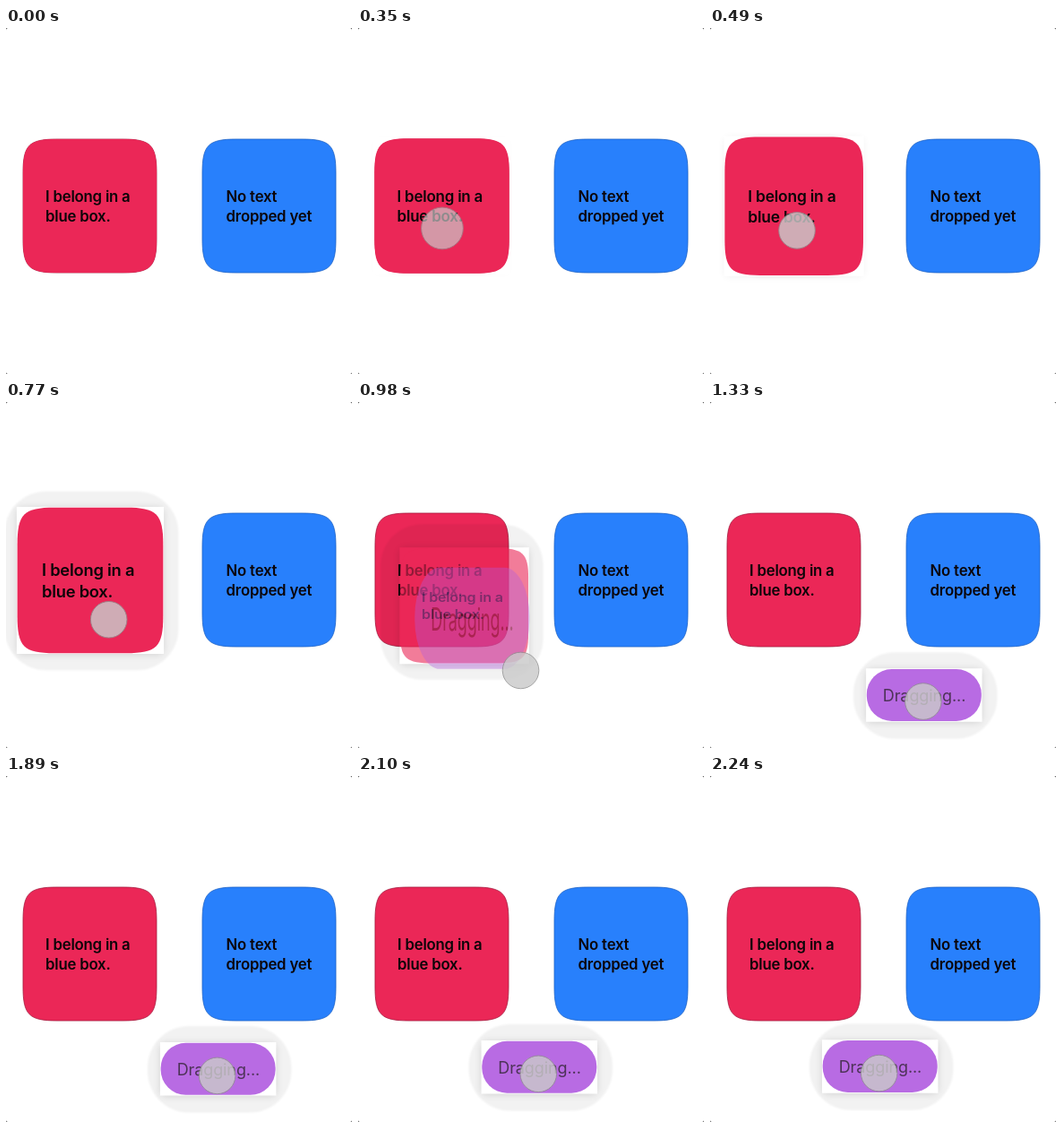
An HTML page for the animation above (2800 ms loop, 386 by 386 pixels).

```html
<!DOCTYPE html>
<html lang="en">
<head>
<meta charset="utf-8">
<title>Drag preview</title>
<style>
  html, body { margin: 0; width: 100%; height: 100%; overflow: hidden; background: #555; }
  svg { display: block; width: 100vw; height: 100vh; }
  text { font-family: Inter, "Liberation Sans", sans-serif; fill: #0b0508; white-space: pre; }
  .label { font-size: 16.8px; font-weight: 600; letter-spacing: -0.22px; }
  .drag { font-size: 18px; font-weight: 400; letter-spacing: -0.1px; fill-opacity: .72; }
</style>
</head>
<body>
<svg viewBox="0 0 386 386">
  <defs>
    <filter id="soft" x="-20%" y="-20%" width="140%" height="140%"><feGaussianBlur stdDeviation="1"/></filter>
    <filter id="near" x="-20%" y="-20%" width="140%" height="140%"><feGaussianBlur stdDeviation="4"/></filter>
    <clipPath id="outside"><path id="hole" clip-rule="evenodd"/></clipPath>
  </defs>
  <rect width="386" height="386" rx="2.5" fill="#fff"/>
  <g id="boxes"></g>
  <g clip-path="url(#outside)">
    <rect id="halo" rx="46" filter="url(#soft)"/>
    <rect id="rim" rx="6" filter="url(#near)"/>
  </g>
  <g id="card"></g>
  <g id="pill">
    <rect width="128" height="58" rx="28" fill="#b15be0"/>
    <text class="drag" x="18" y="36">Dragging...</text>
  </g>
  <circle id="touch" fill="#cacaca" stroke="#8f8f8f"/>
</svg>
<script>
const LOOP = 2800, STEP = 70, SIZE = 149, PILL_W = 128, PILL_H = 58;
const $ = id => document.getElementById(id);
const mix = (a, b, p) => a + (b - a) * p;
const ramp = (t, from, to) => Math.min(1, Math.max(0, (t - from) / (to - from)));
const ease = p => (1 - Math.cos(Math.PI * p)) / 2;
const sigmoid = (t, middle, width) => 1 / (1 + Math.exp((middle - t) / width));

// Square with soft corners: e is where a corner starts, k pulls it outwards.
function squircle(s, e = 38, k = 6.5) {
  return `M0 ${e}C0 ${k} ${k} 0 ${e} 0H${s - e}C${s - k} 0 ${s} ${k} ${s} ${e}` +
    `V${s - e}C${s} ${s - k} ${s - k} ${s} ${s - e} ${s}H${e}C${k} ${s} 0 ${s - k} 0 ${s - e}Z`;
}

function tile(lines, textX, fill, edge) {
  const text = lines.map((s, i) => `<text class="label" x="${textX}" y="${69.8 + 22 * i}">${s}</text>`).join('');
  return `<path d="${squircle(SIZE)}" fill="${fill}" stroke="${edge}" stroke-width=".8"/>${text}`;
}

const red = '#eb2757', note = ['I belong in a', 'blue box.'];
$('boxes').innerHTML =
  `<g transform="translate(19 124)">${tile(note, 25, red, '#a51d40')}</g>` +
  `<g transform="translate(219 124)">${tile(['No text', 'dropped yet'], 26.6, '#2880fc', '#1f62c4')}</g>`;
$('card').innerHTML = tile(note, 25, red, 'none');

function set(el, attrs) {
  for (const k in attrs) el.setAttribute(k, attrs[k]);
}

function place(el, { x, y, w, h }, baseW, baseH, opacity) {
  set(el, {
    transform: `translate(${x - w / 2} ${y - h / 2}) scale(${w / baseW} ${h / baseH})`,
    opacity
  });
}

function drawShadow({ x, y, w, h }, lift, lag) {
  const width = w + 1.4, height = h + 1.4, left = x - width / 2, top = y - height / 2;
  const spread = lift * lift;
  const l = 14 * spread + 24 * lag, t = 18 * spread + 27 * lag;
  const r = 17 * spread - 4 * lag, b = 19 * spread - 5 * lag;
  set($('hole'), { d: `M0 0H386V386H0ZM${left} ${top}h${width}v${height}h${-width}Z` });
  set($('halo'), { x: left - l, y: top - t, width: width + l + r, height: height + t + b, opacity: .052 * lift });
  set($('rim'), { x: left, y: top + 1, width, height, opacity: .125 * lift });
}

function drawTouch(t, back) {
  const press = ramp(t, 280, 420), held = Math.min(t, 1400);
  set($('touch'), {
    cx: mix(96, 240, sigmoid(held, 945, 92)) - 4.5 * (1 - press) - 50.3 * back,
    cy: mix(225, 335, sigmoid(held, 915, 88)) - 3.5 * (1 - press) - 3 * back,
    r: mix(26.5, 20.3, press),
    opacity: t < STEP ? 0 : mix(.55, .82, press)
  });
}

function draw(t) {
  const lift = ramp(t, 300, 780);
  const morph = ease(ramp(t, 840, 1200));
  const back = ease(ramp(t, 1820, 2240));
  const lag = Math.sin(Math.PI * ramp(t, 900, 1340)) ** 2;
  const x = mix(94, 240, ease(ramp(t, 840, 1360))) - 50.3 * back;
  const y = mix(199, 327, ease(ramp(t, 840, 1290))) - 3 * back;
  const size = SIZE + 14 * lift;

  const card = { x: x - .5 * (1 - lift), y: y - .5 * (1 - lift), w: mix(size, PILL_W, Math.sqrt(morph)), h: mix(size, PILL_H, morph) };
  const pill = { x: x + 13 * (1 - morph), y: y + 21 * (1 - morph), w: PILL_W, h: mix(140, PILL_H, morph) };
  place($('card'), card, SIZE, SIZE, Math.max(0, 1 - 1.2 * morph));
  place($('pill'), pill, PILL_W, PILL_H, Math.min(.9, 1.1 * morph));
  drawShadow(morph < .5 ? card : pill, lift, lag);
  drawTouch(t, back);
}

const start = performance.now();
function tick() {
  const t = (performance.now() - start) % LOOP;
  draw(Math.floor(t / STEP) * STEP);
  requestAnimationFrame(tick);
}
draw(0);
requestAnimationFrame(tick);
</script>
</body>
</html>
```
